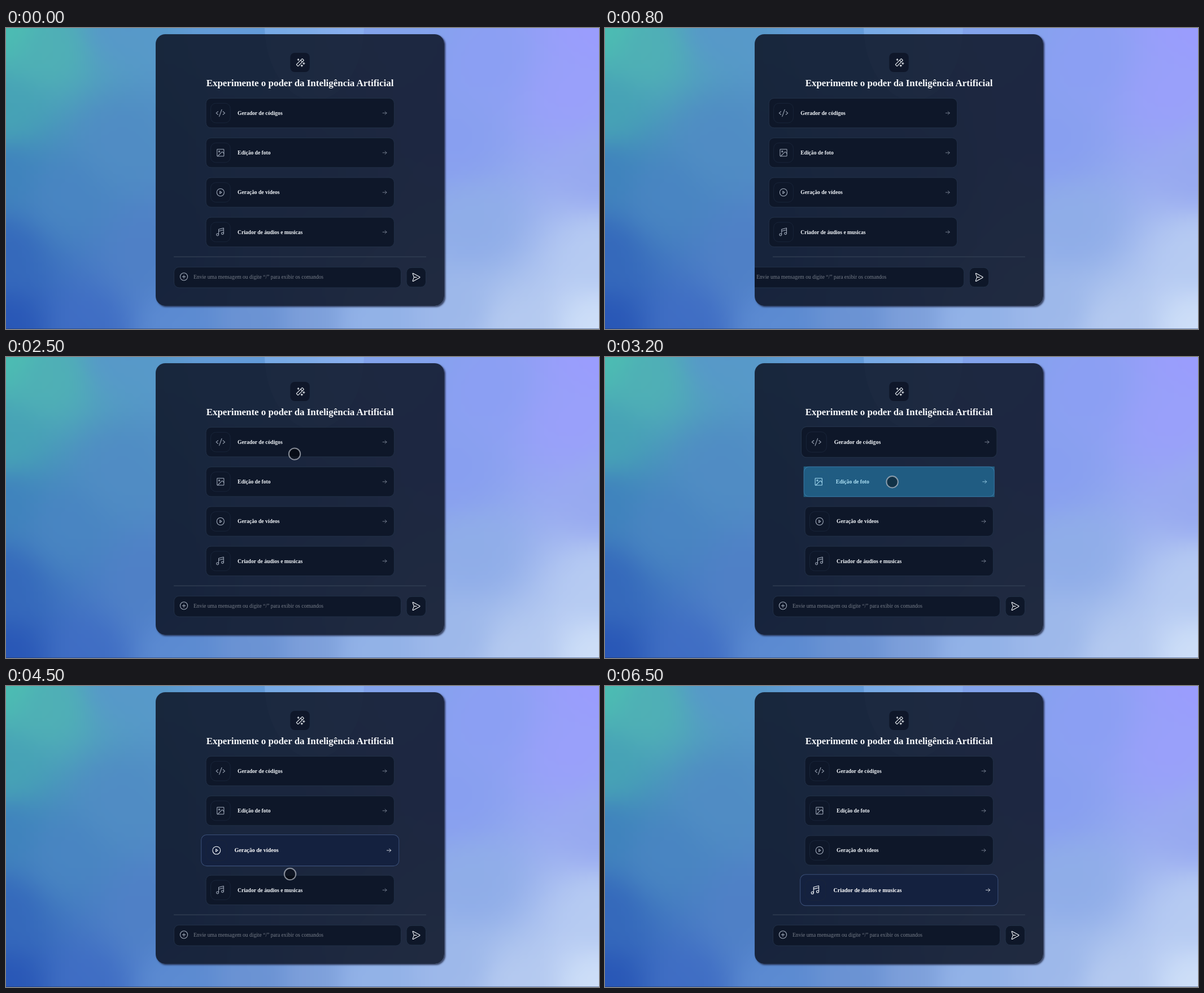
Recreate the animation shown at these times as an HTML page with a canvas. Size 1050 by 533 pixels, loop 7600 ms.

```html
<!DOCTYPE html>
<html lang="pt-BR">
<head>
<meta charset="utf-8">
<title>Inteligência Artificial</title>
<style>
html, body { margin: 0; width: 100%; height: 100%; overflow: hidden; background: #5f8fce; }
#stage { position: relative; width: 1050px; height: 533px; overflow: hidden; }
#stage > * { position: absolute; left: 0; top: 0; }
#stage > #panel {
  left: 265px; top: 11px; width: 511px; height: 481px; border-radius: 17px;
  background: rgba(15, 23, 42, .88);
  box-shadow: 2px 2px 3px rgba(28, 34, 60, .8), inset 0 0 1px rgba(120, 150, 190, .35);
}
svg text { font-family: "Liberation Serif", "Times New Roman", Times, serif; font-size: 9.58px; }
.title { font-size: 16.92px !important; font-weight: bold; fill: #f8fafc; text-anchor: middle; }
.label { font-weight: bold; fill: #f1f5f9; }
.hint { fill: #767d89; }
.box { fill: #0e1729; stroke: #223148; stroke-width: 1; }
.tile { fill: none; stroke: #1a263b; stroke-width: .9; }
.icon { fill: none; stroke: #a5afbf; stroke-width: 15; stroke-linecap: round; stroke-linejoin: round; }
.arrow { stroke: #8d98a8; stroke-width: 20; }
.bright { stroke: #f1f5f9; }
.on .box { fill: #14213f; stroke: #3a4f78; }
.on .icon { stroke: #f4f7fb; }
.on .label { fill: #fff; }
.tap { fill: rgba(51, 181, 229, .4); }
</style>
</head>
<body>
<div id="stage">
  <canvas id="sky" width="1050" height="533"></canvas>
  <div id="panel"></div>
  <svg id="ui" width="1050" height="533" viewBox="0 0 1050 533"></svg>
</div>
<script>
const LOOP = 7600, STEP = 100;

const shapes = {
  wand: '<rect x="28" y="100" width="200" height="56" rx="8" transform="rotate(-45 128 128)"/>' +
        '<path d="M144 80l32 32M216 128v48M192 152h48M84 40v40M64 60h40M168 184v40M148 204h40"/>',
  code: '<path d="M64 88L16 128L64 168M192 88L240 128L192 168M160 40L96 216"/>',
  image: '<rect x="40" y="40" width="176" height="176" rx="8"/><circle cx="96" cy="96" r="16"/>' +
         '<path d="M57 216L166 106a8 8 0 0 1 12 0L216 145"/>',
  play: '<circle cx="128" cy="128" r="96"/><path d="M160 128L112 96V160Z"/>',
  music: '<circle cx="180" cy="164" r="28"/><circle cx="52" cy="196" r="28"/>' +
         '<path d="M208 72L80 104M80 196V56L208 24V164"/>',
  arrow: '<path d="M40 128H216M144 56L216 128L144 200"/>',
  plus: '<circle cx="128" cy="128" r="96"/><path d="M88 128H168M128 88V168"/>',
  send: '<path d="M210 121L58 36a8 8 0 0 0-11 10L76 125a7 7 0 0 1 0 6L47 210a8 8 0 0 0 11 10L210 135a8 8 0 0 0 0-14ZM80 128H136"/>'
};

const icon = (name, x, y, size, cls = '') =>
  `<g class="icon ${cls}" transform="translate(${x - size / 2} ${y - size / 2}) scale(${size / 256})">${shapes[name]}</g>`;
const box = (x, y, w, h, r, cls = 'box') =>
  `<rect class="${cls}" x="${x}" y="${y}" width="${w}" height="${h}" rx="${r}"/>`;

const cards = [
  ['code', 'Gerador de códigos'],
  ['image', 'Edição de foto'],
  ['play', 'Geração de vídeos'],
  ['music', 'Criador de áudios e musicas']
];
const midX = 520.7;
const cardY = i => 150.6 + i * 70.25;

function cardMarkup([name, label], i) {
  const y = cardY(i);
  return `<g class="card">${box(354, y - 26.2, 333.4, 52.4, 9)}${box(362.5, y - 17.3, 34.6, 34.6, 9, 'tile')}` +
    icon(name, 379.8, y, 17.6) +
    `<text class="label" x="410" y="${y + 3.2}">${label}</text>` +
    icon('arrow', 670.5, y, 10, 'arrow') +
    box(353.5, y - 26.7, 334.4, 53.4, 0, 'tap') + '</g>';
}

const arrowHeads = [0, 90, 180, 270].map(a =>
  `<path transform="rotate(${a})" d="M0 -7.2L3.2 -3.8H1.3V-1.3H-1.3V-3.8H-3.2Z"/>`).join('');

document.getElementById('ui').innerHTML =
  `<clipPath id="clip">${box(265, 11, 511, 481, 17, '')}</clipPath>` +
  box(503.3, 44, 34.4, 34, 8, 'badge').replace('<rect', '<rect fill="#0f172a"') +
  icon('wand', 520.8, 61, 19, 'bright') +
  '<text class="title" x="520.5" y="102.5">Experimente o poder da Inteligência Artificial</text>' +
  '<path d="M297 405.2H744" stroke="#334155" stroke-width="1.3"/>' +
  `<g clip-path="url(#clip)"><g id="slide">${cards.map(cardMarkup).join('')}` +
  box(297.5, 423.3, 402, 36.6, 9) + icon('plus', 315, 440.4, 17.6) +
  '<text class="hint" x="332" y="444.3">Envie uma mensagem ou digite “/” para exibir os comandos</text>' +
  box(709, 424.3, 34.5, 34.5, 9) + icon('send', 726.3, 441.4, 19.5, 'bright') + '</g></g>' +
  '<g id="cursor">' +
  `<g id="move" fill="#15161c" stroke="#d9cfb6" stroke-width=".9">${arrowHeads}</g>` +
  '<circle id="touch" r="10.2" fill="rgba(0,0,0,.45)" stroke="rgba(190,195,203,.68)" stroke-width="2"/></g>';

// Backdrop: colours spread from a few anchor points (x, y, colour).
const anchors = `0 0 4cbdb2,80 40 4fb0b5,200 0 5798c9,0 150 46a3b5,0 260 3f82bd,100 300 4985c2,
200 200 508cc4,0 400 3468bb,0 533 2856b6,150 533 3f6dc4,250 400 4f80c6,300 533 5c8bd2,450 520 6a92d3,
540 520 7d9fda,640 525 93b3e8,400 0 639bd8,520 250 6f97d8,700 5 83a3ec,850 60 8b9ff3,1050 0 9a9dfd,
1000 120 99a0fa,800 200 889ff0,1050 250 97a9f0,830 350 8fade8,1050 400 b6cbf2,900 533 b5caf0,
1050 533 cedff8,800 500 9db8ea`.split(',').map(s => {
  const [x, y, hex] = s.trim().split(' ');
  const n = parseInt(hex, 16);
  return { x: +x, y: +y, rgb: [n >> 16, n >> 8 & 255, n & 255] };
});

function paintSky() {
  const w = 150, h = 76;
  const small = Object.assign(document.createElement('canvas'), { width: w, height: h });
  const sc = small.getContext('2d'), img = sc.createImageData(w, h);
  for (let j = 0; j < h; j++) for (let i = 0; i < w; i++) {
    const x = (i + .5) * 1050 / w, y = (j + .5) * 533 / h, sum = [0, 0, 0];
    let total = 0;
    for (const a of anchors) {
      const k = 1 / ((x - a.x) ** 2 + (y - a.y) ** 2 + 1800) ** 1.7;
      total += k;
      a.rgb.forEach((v, c) => sum[c] += v * k);
    }
    img.data.set([...sum.map(v => v / total), 255], (j * w + i) * 4);
  }
  sc.putImageData(img, 0, 0);
  const g = document.getElementById('sky').getContext('2d');
  g.imageSmoothingQuality = 'high';
  g.drawImage(small, 0, 0, 1050, 533);
  g.fillStyle = 'rgba(145, 190, 245, .42)';
  g.beginPath();
  g.ellipse(546, -4, 88, 132, 0, 0, 7);
  g.fill();
  g.fillStyle = 'rgba(24, 48, 100, .5)';
  g.fillRect(0, 532, 1050, 1);
}
paintSky();

const clamp = v => Math.min(1, Math.max(0, v));

// cubic-bezier(.25, .1, .25, 1)
function ease(p) {
  p = clamp(p);
  if (p === 0 || p === 1) return p;
  const at = (u, a, b) => 3 * u * (1 - u) ** 2 * a + 3 * u * u * (1 - u) * b + u ** 3;
  let lo = 0, hi = 1;
  for (let n = 0; n < 24; n++) {
    const u = (lo + hi) / 2;
    if (at(u, .25, .25) < p) lo = u; else hi = u;
  }
  return at(lo, .1, 1);
}

const taps = [2600, 3150, 4150, 5050, Infinity];
const path = [
  [1500, 540, 108], [1900, 519.3, 135.5], [2000, 513, 170], [2200, 509, 211], [2300, 509, 211],
  [2600, 512, 152], [2800, 511, 157], [3100, 508.6, 221.2], [3200, 508.6, 221.2], [3500, 505, 270],
  [3600, 505, 270], [4100, 503, 290], [4300, 503, 298], [4500, 503, 333], [4900, 503, 354],
  [5400, 502.7, 359.2], [5950, 502.7, 359.2], [6400, 567, 108], [6500, 567, 108]
];

function cursorAt(t) {
  const k = path.findIndex(p => p[0] > t);
  if (k < 1) return null;
  const [t0, x0, y0] = path[k - 1], [t1, x1, y1] = path[k];
  const p = (t - t0) / (t1 - t0);
  return [x0 + (x1 - x0) * p, y0 + (y1 - y0) * p];
}

const $ = id => document.getElementById(id);
const cardEls = [...document.querySelectorAll('.card')];
const tapEls = [...document.querySelectorAll('.tap')];
const show = (el, on) => el.setAttribute('visibility', on ? 'visible' : 'hidden');

function draw(t) {
  const shift = t < 100 ? 0 : -590 * (1 - ease((t - 190) / 1000));
  $('slide').setAttribute('transform', `translate(${shift} 0)`);

  cardEls.forEach((el, i) => {
    const grow = ease((t - taps[i]) / 300) - ease((t - taps[i + 1]) / 300);
    const s = 1 + .05 * grow, y = cardY(i);
    el.setAttribute('transform', `translate(${midX} ${y}) scale(${s}) translate(${-midX} ${-y})`);
    el.classList.toggle('on', t >= taps[i] && t < taps[i + 1]);
    show(tapEls[i], t >= taps[i] && t < taps[i] + 200);
  });

  const pos = cursorAt(t);
  if (pos) $('cursor').setAttribute('transform', `translate(${pos})`);
  show($('move'), pos && t < 2000);
  show($('touch'), pos && t >= 2000);
}

const start = performance.now();
function tick() {
  const t = (performance.now() - start) % LOOP;
  draw(Math.floor(t / STEP) * STEP);
  requestAnimationFrame(tick);
}
tick();
</script>
</body>
</html>
```
